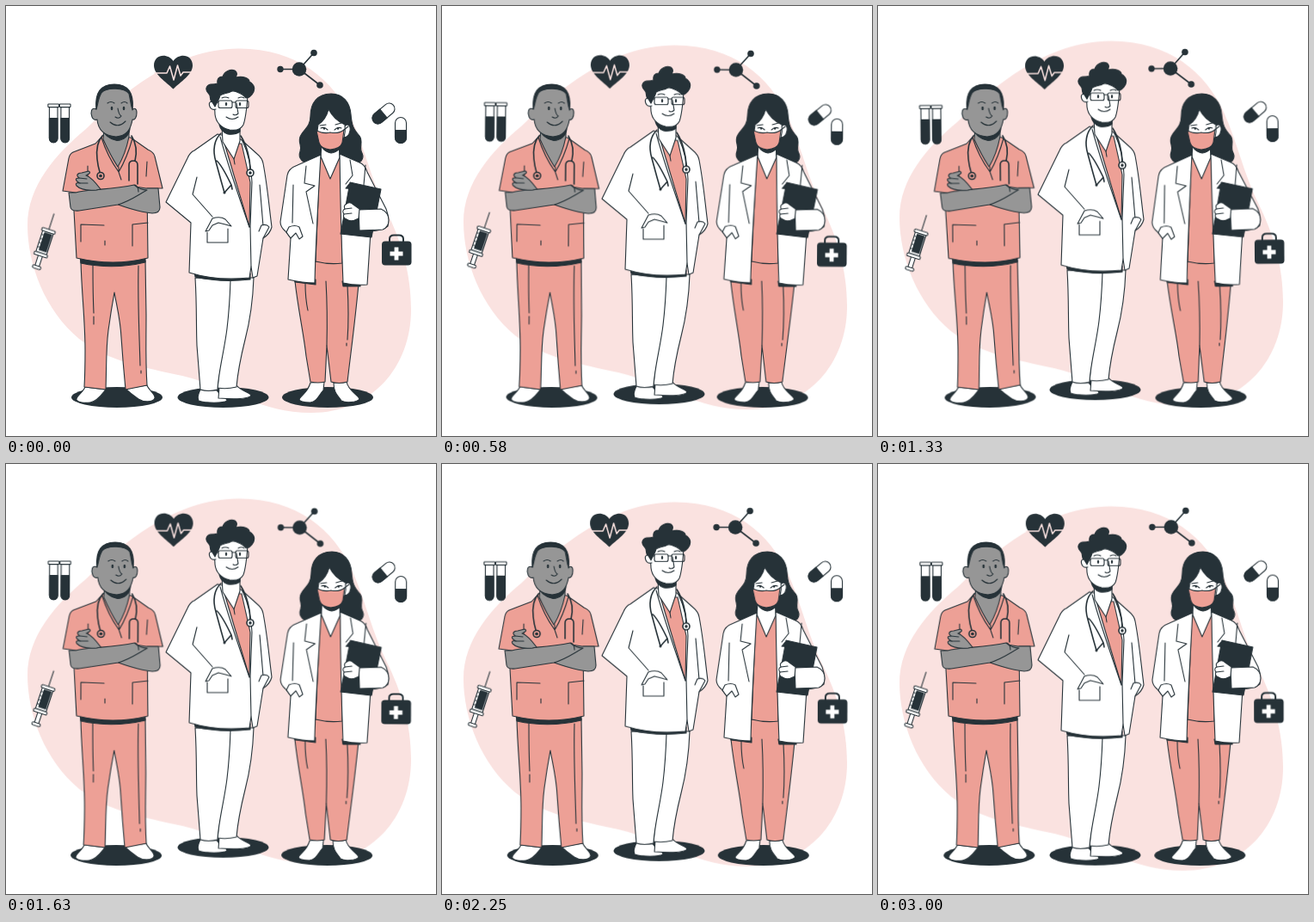
Recreate the animation shown at these times as an HTML page without scripts. Size 500 px wide and 500 px high, loop 3040 ms.

```html
<!DOCTYPE html>
<html lang="en">
<head>
<meta charset="utf-8">
<title>Medical team</title>
<style>
html, body { margin: 0; width: 100%; height: 100%; overflow: hidden; background: #fff; }
svg { display: block; width: 100%; height: 100%; }
svg { stroke: #263238; stroke-width: 1.1; stroke-linejoin: round; stroke-linecap: round; fill: none; }
.blob { fill: #fae2e0; stroke: none; }
.ink { fill: #263238; }
.pink { fill: #eda096; }
.skin { fill: #969696; }
.white { fill: #fff; }
.bare { stroke: none; }
.tube { stroke-width: 1.6; }
.float { animation: float 3040ms linear infinite; }
.sway { animation: sway 1520ms linear infinite; }
#icons { transform-origin: 251px 178px; }
#nurse { transform-origin: 125px 279px; }
#surgeon { transform-origin: 382px 285px; }
@keyframes float { 50% { transform: translateY(-10px); } }
@keyframes sway {
  25% { transform: rotate(1deg); }
  75% { transform: rotate(-1deg); }
}
</style>
</head>
<body>
<svg viewBox="0 0 500 500">
<defs>
  <ellipse id="shadow" class="ink bare" rx="53" ry="12"/>
  <g id="vial">
    <path class="white" d="M1.500 3.500V40a4.800 4.800 0 0 0 9.600 0V3.500z"/>
    <path class="ink" d="M1.500 16.500V40a4.800 4.800 0 0 0 9.600 0V16.500z"/>
    <rect class="white" x="0" y="0" width="12.600" height="3.600" rx=".6"/>
  </g>
  <g id="pill">
    <rect class="white" x="-6.500" y="-15" width="13" height="30" rx="6.500"/>
    <path class="ink" d="M-6.500 0H6.500V8.500a6.500 6.500 0 0 1-13 0z"/>
  </g>
</defs>

<path class="blob float" d="M25 255C25 209 58 172 93 143C135 102 195 50 270 49.500C338 49 381 86 402 132C418 168 426 206 443 240C459 272 471 310 471 353C471 420 425 473 355 473C295 473 262 444 205 430C160 420 120 414 85 387C45 354 25 300 25 255Z"/>

<g id="icons" class="sway">
  <use href="#vial" x="48.900" y="114"/>
  <use href="#vial" x="62.400" y="114"/>

  <path class="ink bare" d="M194.500 96.500C186 88 172 80 172 69C172 56 188 54 194.500 64C201 54 217 56 217 69C217 80 203 88 194.500 96.500Z"/>
  <path stroke="#fae2e0" stroke-width="1.500" d="M173 78H187L190.500 70L195 86L199.500 69L203 81L206 77H216"/>

  <path class="tube" d="M319 73.500L341 73.500L358 54.500M341 73.500L365 92"/>
  <g class="ink bare">
    <circle cx="341" cy="73.500" r="8.300"/>
    <circle cx="358" cy="54.500" r="3.800"/>
    <circle cx="319" cy="73.500" r="3.700"/>
    <circle cx="365" cy="92" r="3.800"/>
  </g>

  <use href="#pill" transform="translate(439 125) rotate(50)"/>
  <use href="#pill" transform="translate(459 144.500)"/>

  <path stroke-width="2" d="M446 275V271Q446 266.500 451 266.500H457Q462 266.500 462 271V275"/>
  <rect class="ink bare" x="437" y="273.500" width="34.500" height="28" rx="4"/>
  <path stroke="#fff" stroke-width="4.800" stroke-linecap="butt" d="M446.500 288H461.500M454 280.500V295.500"/>

  <g transform="translate(45 275) rotate(18)">
    <path d="M0-35V-16"/>
    <rect class="white" x="-6.500" y="-14" width="13" height="27"/>
    <rect class="ink" x="-3.500" y="-11" width="8.500" height="21"/>
    <rect class="white" x="-8" y="-16" width="16" height="3.500" rx="1"/>
    <path d="M-6.500-8H-4.500M-6.500-3H-4.500M-6.500 2H-4.500M-6.500 7H-4.500"/>
    <rect class="white" x="-2.500" y="16" width="5" height="13"/>
    <rect class="white" x="-8" y="13" width="16" height="3.500" rx="1"/>
    <rect class="white" x="-5" y="28.500" width="10" height="3.500" rx="1.500"/>
  </g>
</g>

<g id="nurse" class="sway">
  <use href="#shadow" x="129" y="455"/>
  <path class="white" d="M92 443L116 446C112 451 106 460 98 461C91 462 84 461 82 458C81 454 89 450 92 443Z"/>
  <path class="white" d="M139 445L164 441C166 447 174 451 173 456C171 461 160 461 154 457C148 453 143 449 139 445Z"/>
  <path class="pink" d="M87 297C88 335 92 365 92 400Q92 425 91 443L116 446C117 420 116 400 119 377Q122 355 126 333C129 350 133 365 134 385Q136 415 139 446L164 441C162 410 163 390 163 360L162 296Z"/>
  <path d="M101 302Q101 335 102 357M102 361V370M154 302C153 345 155 380 156 418M157 424V427"/>
  <path class="ink" d="M86 291L162 291V298Q125 307 87 299Z"/>

  <path class="pink" d="M113 150L104 160L78 170Q74 172 73 177L66 215L81 217L79 238L82 293Q125 303 165 293L164 212L182 212L173 175Q172 170 165 167L145 153Z"/>
  <path d="M95 186V199M164 181L163 198"/>
  <path class="skin" d="M114 142L113 155Q121 173 130 187Q139 172 143 152V140Z"/>
  <path d="M111 153Q118 175 131 193Q141 176 147 154M131 187V193M131 193L134 202"/>
  <path class="ink" d="M113 141C113 150 121 155 129 156.500C137 156 143 151 144 143V135Z"/>

  <path class="skin" d="M105 120C99 117 98 124 100 129C101 132 104 133 106 132C107 144 115 151 128 152C140 151 145 144 147 132C150 133 152 129 152 124C152 119 149 118 147 121C148 104 143 92 126 92C111 92 104 105 105 120Z"/>
  <path class="ink" d="M105 120C103 101 110 91 126 91C142 91 149 101 147 120C145 116 145 110 143 102C138 95 117 94 111 101C107 107 107 115 105 120Z"/>
  <g class="ink bare">
    <ellipse cx="123" cy="119" rx="1.300" ry="2.200"/>
    <ellipse cx="137" cy="119" rx="1.300" ry="2.200"/>
  </g>
  <path d="M118 113Q122 110 126 113M134 113Q138 110 141 113M130 119Q131 126 134 128Q131 132 127 129M121 135Q130 143 139 134"/>

  <path class="tube" d="M112 151Q104 160 106 178Q107 187 109 193M146 151Q154 164 150 180M143 203V185Q143 180 148 180Q153 180 153 185V207"/>
  <circle class="pink tube" cx="110" cy="197.500" r="4"/>
  <circle class="ink" cx="110" cy="197.500" r="1.300"/>

  <path class="skin" d="M163 212H177L179 234Q179 241 170 241C150 239 132 232 115 225L150 210Z"/>
  <path class="skin" d="M73 217L75 234Q76 239 85 238L130 231C144 227 153 220 164 214Q156 214 149 208C130 212 110 213 102 214Q88 215 81 217Z"/>
  <path class="skin" d="M105 214C94 215 86 213 82 209C80 206 83 205 86 206C80 203 80 200 85 200C81 197 83 194 88 194L96 192C100 194 95 196 93 197C99 199 104 205 110 213Z"/>
  <path d="M85 200L94 201M86 206L95 206M150 208Q154 210 154 216"/>
  <path d="M87 274V254L114 255M115 273V278M147 279V254L165 252"/>
</g>

<g class="float">
  <use href="#shadow" x="252.500" y="455"/>
  <path class="white" d="M226 446L245 447C249 453 257 455 257 459C253 462 232 462 224 459C222 455 224 450 226 446Z"/>
  <path class="white" d="M248 443L268 441C273 448 284 449 285 453C281 458 262 457 247 456Z"/>
  <path class="white" d="M258 316H288C287 345 284 365 278 388Q270 420 268 443Q256 446 246 444Z"/>
  <path class="white" d="M220 316C222 350 221 370 222 395L226 446Q235 449 246 446C247 425 254 400 257 375Q260 350 261 319Z"/>
  <path class="ink" d="M219 309L284 311V318Q250 322 220 315Z"/>
  <path class="white" d="M246 149L219 168Q214 170 211 177L186 228L215 252L213 310Q245 320 283 316L285 303L287 316L292 314L299 270Q307 265 309 257C306 234 304 209 299 183Q298 177 292 172L273 155Z"/>

  <path class="pink" d="M254 160L283 257L284 205L274 160Z"/>
  <path class="white" d="M251 140L252 158L265 178L272 157V140Z"/>
  <path d="M265 178L266 184M249 152Q258 185 283 257M275 157Q285 178 286 205Q285 230 284 256L285 303"/>
  <path class="ink" d="M248 138Q250 146 258 149Q267 150 272 146V139Z"/>
  <path d="M222 199L217 219L240 245M295 208L299 256"/>
  <path class="white" d="M232 262L240 247Q249 244 255 248L262 256L255 254L247 252L240 255L236 261Z"/>
  <path d="M234 263V275H258V259"/>
  <path class="white" d="M294 262L297 255Q303 253 306 257L299 270"/>

  <path class="tube" d="M250 148C242 155 240 168 244 181L250 203L254 217L262 208L263 213M245 180C251 185 256 196 262 208M273 151C280 162 284 178 284 190"/>
  <circle class="white tube" cx="284" cy="194" r="4"/>
  <circle class="ink" cx="284" cy="194" r="1.200"/>
  <circle class="ink" cx="254" cy="217" r="1"/>

  <path class="white" d="M243 104C241 113 243 119 243 126C244 135 250 142 260 144Q272 146 276 138C279 130 280 118 281 104Q264 94 243 104Z"/>
  <path class="white" d="M244 113C238 109 235 112 237 117C238 120 241 121 244 120"/>
  <path class="ink" d="M240 112C236 110 239 104 235 101C231 97 233 92 238 91C241 91 243 91 246 90C245 84 248 82 252 82C254 76 261 73 266 75C269 77 269 80 267 83C276 81 283 84 283 88C290 92 290 98 286 103Q283 107 279 107C276 102 270 101 264 98C259 102 253 101 249 104C248 109 245 112 243 117Z"/>
  <g>
    <rect x="247" y="110" width="16" height="8.500" rx="2"/>
    <rect x="267" y="110" width="15" height="8.500" rx="2"/>
    <path d="M263 112H267M242 112H247M251 107Q255 105 259 107M270 107Q274 105 277 107M268 113L270 125Q267 128 264 126M256 129Q263 134 270 129"/>
    <ellipse class="ink" cx="256" cy="114" rx=".7" ry="1.500"/>
    <ellipse class="ink" cx="272" cy="114" rx=".7" ry="1.500"/>
  </g>
</g>

<g id="surgeon" class="sway">
  <use href="#shadow" x="374" y="455"/>
  <path class="white" d="M354 438L370 437L369 447C364 452 362 460 354 461C347 461 341 460 341 457C344 452 351 449 354 438Z"/>
  <path class="white" d="M381 438L396 437C398 448 409 451 411 457C408 461 395 462 390 459C386 453 381 450 381 438Z"/>
  <path class="pink" d="M336 320C340 355 346 380 349 407L354 437Q363 439 371 437L373 395L378 437Q387 440 397 437C400 410 405 375 410 323L391 297H360Z"/>
  <path d="M372 320Q374 355 373 395M348 323Q348 340 351 354M397 325Q399 360 397 388M396 392V395"/>
  <path class="ink" d="M336 316L360 318V324L336 321ZM391 320L412 321V326L392 326Z"/>

  <path class="ink" d="M378 102C362 102 354 113 354 128C354 140 347 143 343 150C338 158 345 162 342 169C339 177 345 184 356 182H402C412 185 417 178 414 171C410 164 416 158 411 151C404 143 402 139 401 126C400 112 392 102 378 102Z"/>
  <path class="pink" d="M365 177L360 297Q376 301 391 299L389 177Z"/>
  <path class="white" d="M367 160L366 175L377 201L388 176L387 160Z"/>
  <path class="ink" d="M364 154Q366 169 378 171Q389 170 392 156Z"/>

  <path class="white" d="M366 173L339 185Q328 189 327 197L319 251Q319 257 325 262L331 270L328 318Q345 322 359 322C360 275 363 225 366 173Z"/>
  <path d="M334 208L333 252M349 186L347 206L359 209L349 216L357 253"/>
  <path class="white" d="M326 263L329 257Q336 254 341 257L345 268L341 271L337 264L331 270Z"/>
  <path class="white" d="M388 172L411 182Q417 184 420 193L442 236Q446 246 444 256Q438 261 424 262L420 324Q405 325 392 322Q389 250 388 172Z"/>
  <path d="M400 179L403 197L395 207M418 185L416 208"/>

  <path class="ink" d="M400 205L436 213L425 269L389 265Z"/>
  <path class="ink" d="M395 212L399 207L412 209L410 213Z"/>
  <path class="white" d="M410 237L436 236Q445 240 445 249Q445 257 438 260L411 261Z"/>
  <path class="white" d="M411 236L404 231Q400 227 396 230Q392 232 394 236Q390 238 393 242Q391 246 396 248Q401 252 410 247Z"/>
  <path d="M394 236L402 235M393 242L402 241"/>

  <path class="white" d="M393 141C397 135 401 139 400 145C399 151 395 154 392 152Z"/>
  <path class="white" d="M363 138C361 146 362 157 368 163Q377 169 387 163C393 157 395 147 394 138Q382 133 375 120Q372 132 363 138Z"/>
  <path class="pink" d="M361 145Q370 149 377 147Q387 149 393 144L391 159Q389 166 377 167Q366 166 364 159Z"/>
  <path d="M365 139L372 138M383 138L390 136M366 142Q370 140 374 144M382 144Q386 140 390 142M393 144L398 140"/>
  <circle class="ink bare" cx="370" cy="142.500" r="1.200"/>
  <circle class="ink bare" cx="386" cy="142.500" r="1.200"/>
</g>
</svg>
</body>
</html>
```
